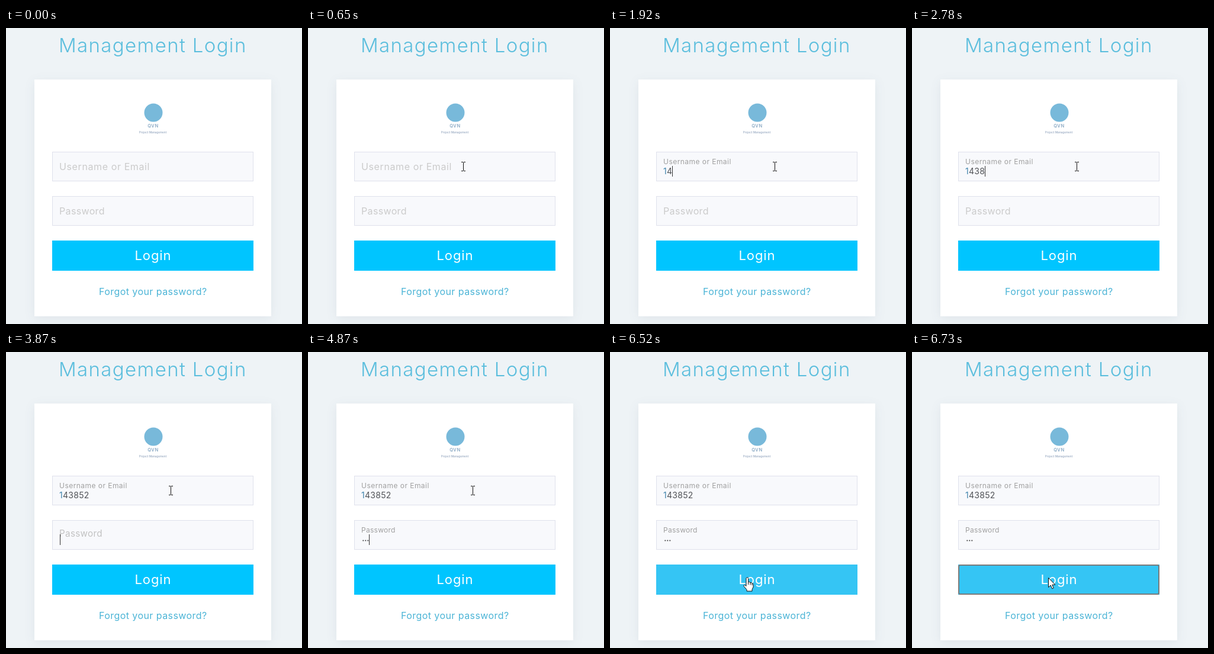
Recreate the animation shown at these times as an HTML page. Size 500 by 500 pixels, loop 7 s.

```html
<!DOCTYPE html>
<html lang="en">
<head>
<meta charset="utf-8">
<title>Login</title>
<style>
html, body { margin: 0; width: 100%; height: 100%; overflow: hidden; background: #eef3f6; }
svg { display: block; width: 100%; height: 100%; }
text { font: 16px Inter, "Open Sans", sans-serif; font-optical-sizing: none; }
.card { fill: #fff; filter: drop-shadow(0 4px 9px rgba(40, 60, 90, .07)); }
.field { fill: #f8f9fc; stroke: #dfe1ec; }
.title { font-size: 33px; font-weight: 300; letter-spacing: .041em; fill: #5bbedd; }
.brand { font-size: 7.5px; font-weight: 600; letter-spacing: .09em; fill: #8aa9c4; text-anchor: middle; }
.tag { font-size: 4.7px; font-weight: 500; fill: #93a5be; text-anchor: middle; }
.login { font-size: 22px; letter-spacing: .04em; fill: #fff; }
.link { letter-spacing: .027em; fill: #4bb4d6; }
#user { letter-spacing: .038em; }
#pass { letter-spacing: .022em; }
#typed { font-size: 14px; letter-spacing: .02em; fill: #505256; }
#typed tspan:first-child { fill: #3f83ac; }
#ibeam { fill: none; stroke: #111; }
#arrow, #hand { fill: #fff; stroke: #111; stroke-linejoin: round; }
</style>
</head>
<body>
<svg viewBox="0 0 500 500">
  <text class="title" x="89" y="41">Management Login</text>
  <rect class="card" x="48" y="87" width="400" height="400"/>
  <circle cx="249" cy="143" r="15.5" fill="#78b9da"/>
  <text class="brand" x="248.5" y="167.5">QVN</text>
  <text class="tag" x="248" y="177.5">Project Management</text>
  <rect class="field" x="78.5" y="209.5" width="339" height="49"/>
  <rect class="field" x="78.5" y="284.5" width="339" height="49"/>
  <text id="user" x="90">Username or Email</text>
  <text id="pass" x="90">Password</text>
  <text id="typed" x="90" y="247"><tspan></tspan><tspan></tspan></text>
  <g id="dots" fill="#444">
    <circle cx="93.3" cy="318.5" r="1.1"/>
    <circle cx="97.3" cy="318.5" r="1.1"/>
    <circle cx="101.3" cy="318.5" r="1.1"/>
  </g>
  <rect id="caret" width="1" height="18" fill="#333"/>
  <rect id="button" x="78" y="359" width="340" height="51"/>
  <rect id="ring" x="79" y="360" width="338" height="49" rx="2.5" fill="none" stroke="#7b7b7b" stroke-width="2"/>
  <text class="login" x="217.5" y="392">Login</text>
  <text class="link" x="157" y="451">Forgot your password?</text>
  <g id="cursor">
    <path id="arrow" d="M.5 .5V16.5L4.2 13L6.7 18.8L9.2 17.7L6.8 12.2H11.8Z"/>
    <path id="ibeam" d="M-3 -7.5H0M1 -7.5H4M.5 -7V7M-3 7.5H0M1 7.5H4"/>
    <path id="hand" d="M-2 1.5C-2 -.6 1.6 -.6 1.6 1.5V8C2.5 7 5 7.2 5 9C6 8 8 8.5 8 10C9 9.4 10 10 10 11.5V16L8 20V23H-1V20.5L-6 14.5C-6.6 12.5 -4.5 11.5 -2 14.5ZM1.6 8V12M5 9V12.5M8 10V13"/>
  </g>
</svg>
<script>
const LOOP = 7000, USER_FOCUS = 960, PASS_FOCUS = 3820, HOVER = 6115, PRESS = 6590;
const name = "143852";
const keys = [1720, 1920, 2520, 2780, 2980, 3200];
const dotKeys = [4070, 4410, 4870];
const caretOn = [[940, 1520], [1720, 2450], [2520, 3730], [PASS_FOCUS, 5330], [5860, 6450]];
// time, x, y of the pointer
const path = [
  [180, 424, 488], [250, 422, 418], [320, 420, 352], [390, 335, 290], [450, 288, 252],
  [520, 252, 237], [590, 235, 234], [650, 262, 234], [720, 283, 234], [900, 283, 234],
  [940, 278, 234], [5730, 278, 234], [5930, 262, 270], [6110, 234, 359], [6170, 227, 375],
  [6380, 232, 381], [6720, 232, 381], [6730, 230, 381]
];

const $ = id => document.getElementById(id);
const set = (el, attrs) => { for (const k in attrs) el.setAttribute(k, attrs[k]); };
const show = (el, on) => { el.style.display = on ? "" : "none"; };
const mix = (a, b, p) => a + (b - a) * p;
const count = (times, t) => times.filter(k => t >= k).length;

function ease(t, start) {
  const rest = 1 - Math.min(1, Math.max(0, (t - start) / 300));
  return 1 - rest ** 4 * (5 - 4 * rest);
}

function label(el, y, p) {
  const grey = mix(203, 160, p);
  el.style.fontSize = mix(16, 12, p) + "px";
  set(el, { y: mix(y, y - 10, p), fill: `rgb(${grey},${grey},${grey})` });
}

function pointer(t) {
  const i = path.findIndex(k => k[0] > t);
  if (i < 0) return path[path.length - 1].slice(1);
  if (i === 0) return path[0].slice(1);
  const [a, b] = [path[i - 1], path[i]], p = (t - a[0]) / (b[0] - a[0]);
  return [Math.round(mix(a[1], b[1], p)), Math.round(mix(a[2], b[2], p))];
}

function cursorKind(x, y, t) {
  const within = (top, bottom) => x >= 78 && x < 418 && y >= top && y < bottom;
  if (within(209, 259) || within(284, 334)) return "ibeam";
  return within(359, 410) && t < 6730 ? "hand" : "arrow";
}

function draw(t) {
  label($("user"), 239.5, ease(t, USER_FOCUS));
  label($("pass"), 314.5, ease(t, PASS_FOCUS));

  const typed = name.slice(0, count(keys, t)), [first, rest] = $("typed").children;
  first.textContent = typed.slice(0, 1);
  rest.textContent = typed.slice(1);
  const dots = count(dotKeys, t);
  [...$("dots").children].forEach((d, i) => show(d, i < dots));

  const inPass = t >= PASS_FOCUS;
  const caretX = inPass ? 91 + 4 * dots
    : typed ? Math.round(90 + $("typed").getComputedTextLength()) : 91;
  set($("caret"), { x: caretX, y: inPass ? 308 : 233 });
  show($("caret"), caretOn.some(([a, b]) => t >= a && t < b));

  const hover = ease(t, HOVER);
  set($("button"), { fill: `rgb(${mix(0, 53, hover)},197,${mix(255, 244, hover)})` });
  show($("ring"), t >= PRESS);

  const [x, y] = pointer(t), kind = cursorKind(x, y, t);
  set($("cursor"), { transform: `translate(${x} ${y})` });
  show($("cursor"), t >= 180);
  for (const el of $("cursor").children) show(el, el.id === kind);
}

const start = performance.now();
function tick() {
  draw((performance.now() - start) % LOOP);
  requestAnimationFrame(tick);
}
tick();
</script>
</body>
</html>
```
